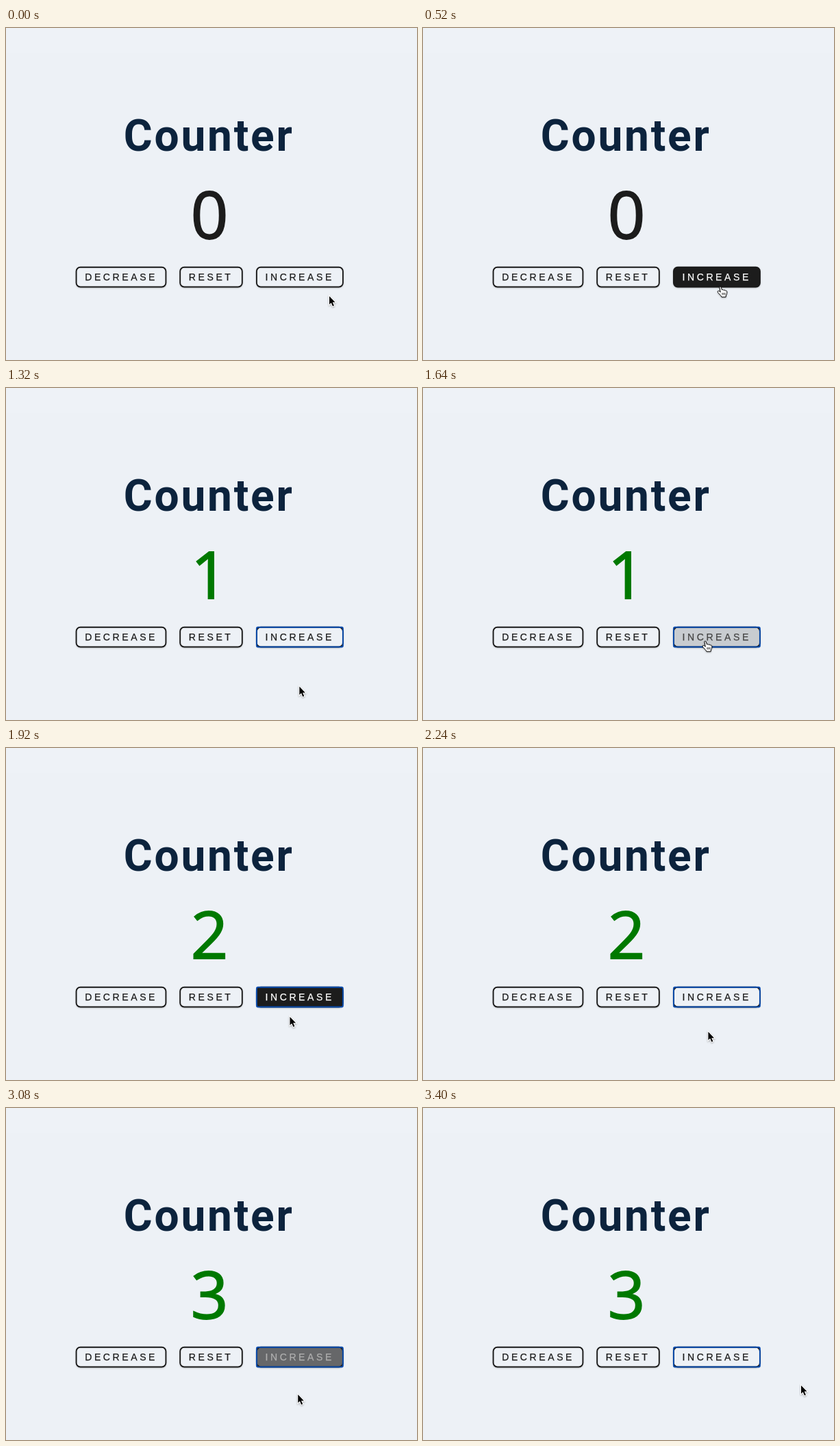
An HTML page that plays this animation: 600x484 px, repeating every 3.44 s.

```html
<!DOCTYPE html>
<html lang="en">
<head>
<meta charset="utf-8">
<title>Counter</title>
<style>
  html, body { margin: 0; width: 100%; height: 100%; overflow: hidden; background: #edf1f6; }
  svg { display: block; width: 600px; height: 484px; }
  .title { font: bold 64px Roboto, sans-serif; letter-spacing: 2.8px; fill: #0c233d; }
  .value { font: 95.5px "Open Sans", sans-serif; text-anchor: middle; stroke-width: 1.8px; }
  .label { font: 14px "Liberation Sans", Arial, sans-serif; letter-spacing: 3.6px; stroke-width: .25px; }
  .box { fill: #edf1f6; stroke: #1a1a1a; stroke-width: 1.9; }
  .shade { filter: drop-shadow(0 1px 1.2px rgba(0, 0, 0, .16)); }
  .cursor { filter: drop-shadow(0 1px .8px rgba(0, 0, 0, .3)); }
</style>
</head>
<body>
<svg viewBox="0 0 600 484">
  <rect width="600" height="484" fill="#edf1f6"/>
  <rect width="600" height="36" fill="#eef2f7"/>
  <text class="title" x="171.7" y="179">Counter</text>
  <text class="value" id="value" x="297" y="306.8">0</text>
  <g id="buttons"></g>
  <rect id="ring" x="365.9" y="348.7" width="126" height="28.8" rx="2" fill="none" stroke="#0a4cae" stroke-width="1.9"/>
  <g class="cursor" id="arrow">
    <path d="M0 0V12L2.7 9.5 4.9 14.6 6.9 13.7 4.7 8.8H8.5Z" fill="#000" stroke="#fff" stroke-width="2" paint-order="stroke"/>
  </g>
  <g class="cursor" id="hand">
    <g transform="translate(-4.8 -.8)" stroke="#000" stroke-linejoin="round">
      <path fill="#fff" d="M3.6 1.6C3.9 .5 5.6 .5 6 1.7L7.2 5.6C8 5 9.3 5.2 9.8 6.2 10.8 5.5 12 5.9 12.4 6.9 13.6 6.4 14.6 7.2 14.6 8.4 14.6 11 14 12.4 13.2 13.6L12.9 16H6.8C6 14.2 4 12.4 2 10.2 .6 8.6 .8 7.4 1.6 7.1 2.8 6.7 4 7.8 5 9Z"/>
      <path d="M7.8 9.8V13M9.8 9.8V13M11.8 9.8V13" stroke-width=".8"/>
    </g>
  </g>
</svg>
<script>
const LOOP = 3440, STEP = 40, FADE = 300, EDGE = 378;
const INK = [28, 28, 28], PAPER = [237, 241, 246], WHITE = [255, 255, 255];
const $ = id => document.getElementById(id);
const clamp = x => Math.max(0, Math.min(1, x));
const smooth = x => { const u = clamp(x); return u * u * (3 - 2 * u); };
const lerp = (a, b, f) => a + (b - a) * f;
const mix = (a, b, f) => `rgb(${a.map((v, i) => Math.round(lerp(v, b[i], f)))})`;

const clicks = [840, 1680, 2840];

// the pointer eases between these places
const stops = [
  { t: 40, x: 472, y: 391 },
  { t: 280, x: 455, y: 372 },
  { t: 520, x: 434, y: 377 },
  { t: 880, x: 434, y: 377 },
  { t: 1280, x: 429, y: 438 },
  { t: 1620, x: 412, y: 369 },
  { t: 1840, x: 413, y: 369 },
  { t: 2000, x: 416, y: 415 },
  { t: 2220, x: 416.5, y: 414.5 },
  { t: 2500, x: 413, y: 369 },
  { t: 2880, x: 413, y: 369 },
  { t: 3060, x: 425, y: 418 },
  { t: 3400, x: 552, y: 404.5 }
];

function addButton(name, x, width) {
  $("buttons").insertAdjacentHTML("beforeend", `
    <rect class="box shade" x="${x}" y="348.7" width="${width}" height="28.8" rx="6"/>
    <text class="label" x="${x + 12.6}" y="368" fill="${mix(INK, INK, 0)}" stroke="${mix(INK, INK, 0)}">${name}</text>`);
}
addButton("DECREASE", 102.6, 130.8);
addButton("RESET", 254.2, 90.6);
addButton("INCREASE", 365.9, 126);
const box = $("buttons").querySelector("rect:last-of-type");
const label = $("buttons").querySelector("text:last-of-type");

function pointer(t) {
  const i = Math.max(1, stops.findIndex(s => s.t >= t));
  const a = stops[i - 1], b = stops[i], f = smooth((t - a.t) / (b.t - a.t));
  return { x: lerp(a.x, b.x, f), y: lerp(a.y, b.y, f) };
}

const inside = t => pointer(t).y < EDGE;

// hover transition, run up from the start of the loop
function darkness(t) {
  let p = 0;
  for (let s = 0; s < t; s += STEP) p = clamp(p + (inside(s) ? STEP : -STEP) / FADE);
  return smooth(p);
}

function draw(t) {
  const count = clicks.filter(c => t >= c).length;
  const over = inside(t), dark = darkness(t), { x, y } = pointer(t);
  const value = $("value").style;

  $("value").textContent = count;
  value.fill = value.stroke = count ? "#007900" : mix(INK, INK, 0);
  box.style.fill = mix(PAPER, INK, dark);
  label.style.fill = label.style.stroke = mix(INK, WHITE, dark);
  $("ring").style.display = count ? "" : "none";
  $("arrow").style.display = over ? "none" : "";
  $("hand").style.display = over ? "" : "none";
  $(over ? "hand" : "arrow").setAttribute("transform", `translate(${x} ${y})`);
}

const start = performance.now();
function tick() {
  const t = (performance.now() - start) % LOOP;
  draw(Math.floor(t / STEP) * STEP);
  requestAnimationFrame(tick);
}
tick();
</script>
</body>
</html>
```
